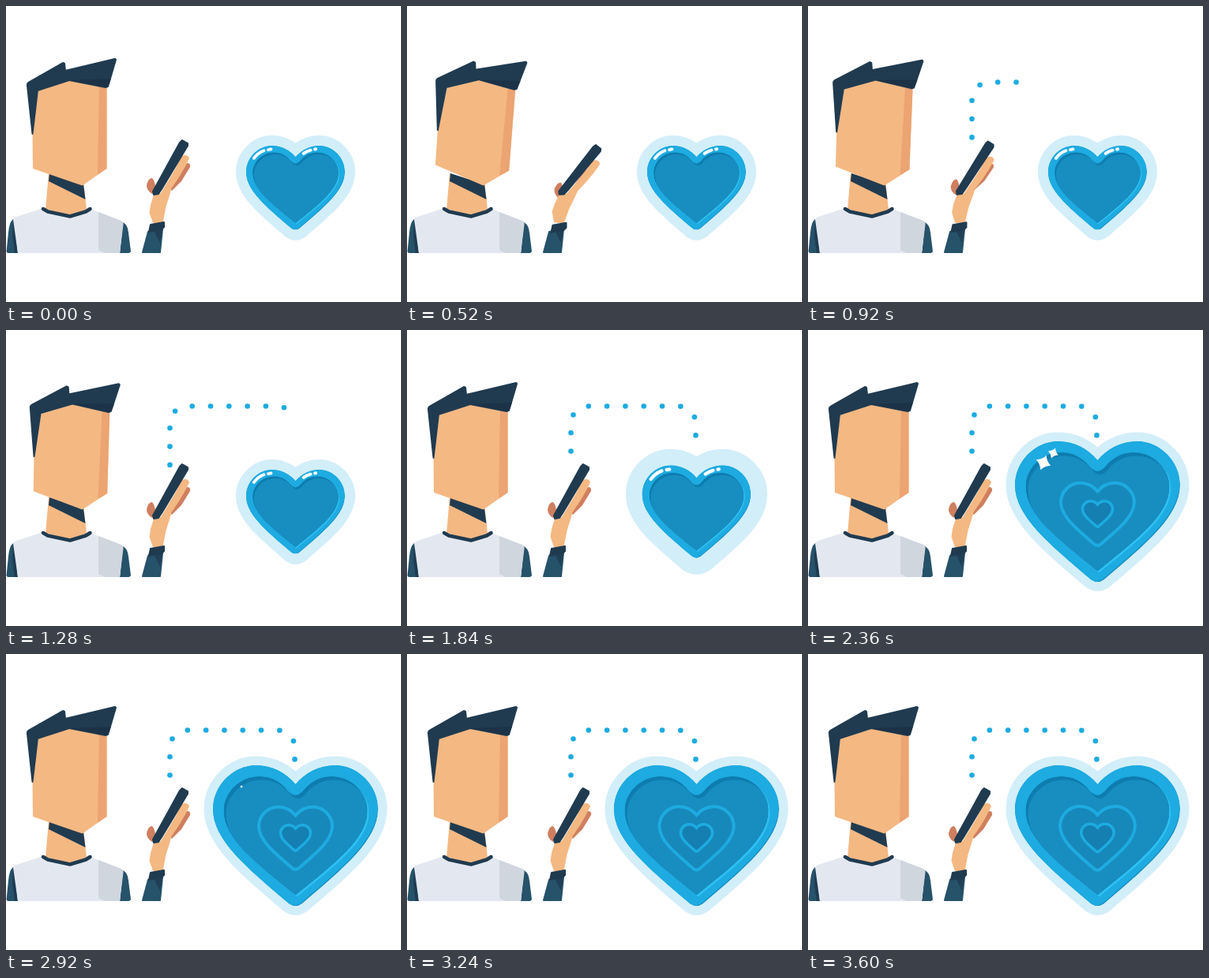
Write an HTML page that moves like this. It is 500x375 px and loops after 3680 ms.

```html
<!DOCTYPE html>
<html lang="en">
<head>
<meta charset="utf-8">
<title>Phone to heart</title>
<style>
html, body { margin: 0; width: 100%; height: 100%; overflow: hidden; background: #fff; }
svg { display: block; width: 500px; height: 375px; }
.round { stroke-linejoin: round; stroke-linecap: round; }
.navy { fill: #203b50; stroke: #203b50; stroke-width: 2; stroke-linejoin: round; }
.clay { fill: #cf7f5f; }
.skin { fill: #f4b882; }
</style>
</head>
<body>
<svg viewBox="0 0 500 375" xmlns="http://www.w3.org/2000/svg">
  <defs>
    <path id="heart" d="M0-65.5C-12-80-30-89.5-50-89.5C-79-89.5-104.5-64-104.5-34C-104.5 5-62 40-8 86Q0 91.500 8 86C62 40 104.5 5 104.5-34C104.5-64 79-89.5 50-89.5C30-89.5 12-80 0-65.5Z"/>
    <path id="face" d="M-10-58C-20-70-32-75.5-46-75.5C-71-75.5-91-55-91-32C-91 3-52 33 0 75C52 33 91 3 91-32C91-55 71-75.5 46-75.5C32-75.5 20-70 10-58Q0-46-10-58Z"/>
    <path id="star" d="M0-10Q3-3 10 0Q3 3 0 10Q-3 3-10 0Q-3-3 0-10Z"/>
    <clipPath id="outline"><use href="#heart"/></clipPath>
    <clipPath id="inside"><use href="#face"/></clipPath>
  </defs>

  <g id="body">
    <path class="skin" d="M54 212L98.500 226L102 258L79 267L50 258Z"/>
    <path fill="#203b50" d="M55 212L98 226L100.500 245L54 222Z"/>
    <path fill="#26526a" d="M9 270Q4 274 3 287L0.500 311Q1 313 3 313H15L11 272Z"/>
    <path fill="#203b50" d="M9 271L14.500 313H11L8 290Z"/>
    <path fill="#26526a" d="M148 274Q154 277 155 287L158 311Q157 313 155 313H144Z"/>
    <path fill="#e3e8f0" d="M9 270Q10 268 13 267L47 256L81 266L106 257L117 261L148 274L144 313H15Z"/>
    <path fill="#d0d6de" d="M117 261L146 272Q149 274 148.500 277L144 313H125L117 309Z"/>
    <path class="round" fill="none" stroke="#203b50" stroke-width="4.500" d="M47 257L53 260.500L81 266.500L101 260.500L106.500 257"/>
  </g>

  <g id="head">
    <path class="skin" d="M41 107L80 94L127.500 100V206L96.500 227.500L34 206L33.500 160Z"/>
    <path fill="#eba472" d="M118 100H127.500V206L116 213.500Z"/>
    <path class="navy" d="M27 101Q26.500 98 29 96.500L72 72L74 73L75 82L138 67L139 68L129 102L126 103L80 94L40 107L33.500 162Z"/>
    <path fill="#1c3247" d="M80 94L133 92L129 102L126 103Z"/>
  </g>

  <path fill="#26526a" stroke="#26526a" stroke-width="2" stroke-linejoin="round" d="M180 286L198 283L195 312H173Z"/>
  <path fill="#203f55" d="M188 286L198 283L195 300Z"/>
  <g id="hand">
    <path class="clay" id="finger" d="M229 199Q234 199 233 204L222 222L210 234L208 232L217 212Z"/>
    <path class="clay" id="thumb" d="M178 227Q180 218 185 218Q189 222 190 236L185 238Q178 234 178 227Z"/>
    <path class="skin" d="M186 275L181.500 262L183 252L187 239L196 237L205 222L215 205L222 190Q230 187 232 193L226 205L219 217L209.500 231L207 240L202.500 254L198.500 275Z"/>
    <path class="navy" d="M223 170L230 174V177L197 232L193 238L187 239L186 235L220 173Z"/>
  </g>
  <path class="navy" id="cuff" d="M183 277L200 274V280L197 283L181 286Z"/>

  <path id="track" fill="none" d="M207.500 175V118.500A22 22 0 0 1 229.500 96.500H343.500A22 22 0 0 1 365.500 118.500V134"/>
  <g id="dots" fill="#1dabe1"></g>

  <g transform="translate(366.500 230.500)">
    <g id="big">
      <use id="glow" class="round" href="#heart" fill="#d2eef9" stroke="#d2eef9"/>
      <g clip-path="url(#outline)">
        <use href="#heart" fill="#188dc0"/>
        <use href="#heart" fill="#1dabe1" transform="translate(-1.500 -1.500)"/>
        <use href="#heart" fill="none" stroke="#1dabe1" stroke-width="4" transform="translate(-2.500 -2.500)"/>
      </g>
      <use href="#face" fill="#2ec0f2" transform="translate(2 2)"/>
      <g clip-path="url(#inside)">
        <use href="#face" fill="#0e7cae"/>
        <use href="#face" fill="#188dc0" transform="translate(3 4.500)"/>
      </g>
      <path id="shine" class="round" fill="none" stroke="#fff" stroke-width="6.500" d="M-88-63Q-80-74-67-79M-57.500-81L-52-82M17-73Q24-78 32-80M41-82L43-82.300"/>
    </g>
    <g id="small" stroke="#1dabe1">
      <use id="mid" href="#heart" fill="#1788ba"/>
      <use id="core" href="#heart" fill="#147fb0"/>
    </g>
  </g>
  <g fill="#fff">
    <use id="starA" href="#star"/>
    <use id="starB" href="#star"/>
  </g>
</svg>

<script>
const LOOP = 3680, STEP = 40, GAP = 23.3, COUNT = 11;
const $ = id => document.getElementById(id);
const set = (id, name, value) => $(id).setAttribute(name, value);
const span = (t, a, b) => Math.max(0, Math.min(1, (t - a) / (b - a)));
const mix = (a, b, k) => a + (b - a) * k;
const inOut = u => u < 0.5 ? 2 * u * u : 1 - 2 * (1 - u) * (1 - u);
const out = u => 1 - (1 - u) * (1 - u);

const track = $("track");
const trackLen = 21.5 + (COUNT - 1) * GAP;
const dots = Array.from({ length: COUNT }, () => {
  const dot = document.createElementNS("http://www.w3.org/2000/svg", "circle");
  dot.setAttribute("r", 3.3);
  return $("dots").appendChild(dot);
});

function drawMan(t) {
  const rise = inOut(span(t, 0, 550));
  const lean = rise * (1 - 0.6 * out(span(t, 560, 1200)) - 0.4 * inOut(span(t, 1200, 1760)));
  const tap = rise * (1 - inOut(span(t, 600, 1120)));
  set("head", "transform", `rotate(${4.5 * lean} 96 228)`);
  set("hand", "transform", `rotate(${9 * tap} 192 275)`);
  set("finger", "transform", `translate(${-5 * tap} ${-5 * tap})`);
  set("thumb", "transform", `translate(${2 * tap} ${6 * tap})`);
  set("cuff", "transform", `translate(${1.5 * tap} ${0.7 * tap})`);
}

function drawDots(t) {
  const front = trackLen * out(span(t, 590, 1740));
  dots.forEach((dot, i) => {
    const s = front - i * GAP, on = t > 590 && s >= 0;
    dot.style.display = on ? "" : "none";
    if (!on) return;
    const p = track.getPointAtLength(s);
    dot.setAttribute("cx", p.x);
    dot.setAttribute("cy", p.y);
  });
}

// A small heart whose line keeps its width at any scale
function drawRing(id, y, scale, line) {
  set(id, "transform", `translate(0 ${y}) scale(${scale})`);
  set(id, "stroke-width", line / scale);
}

function drawStar(id, x, y, scale) {
  $(id).style.display = scale > 0.01 ? "" : "none";
  set(id, "transform", `translate(${x} ${y}) rotate(22) scale(${scale})`);
}

function drawHeart(t) {
  const half = mix(62.5, 104.5, inOut(span(t, 1720, 2160)));
  const halo = mix(75.5, 116, inOut(span(t, 1640, 2120)));
  const size = half / 104.5;
  set("big", "transform", `scale(${size})`);
  set("glow", "stroke-width", 2 * (halo - half) / size);
  set("shine", "opacity", 1 - span(t, 1880, 2040));

  const grow = out(span(t, 2000, 2280));
  const beat = 0.3 - 0.5 * Math.cos((t - 2640) / 1920 * 2 * Math.PI);
  $("small").style.display = grow > 0 ? "" : "none";
  if (grow > 0) {
    set("small", "opacity", grow);
    drawRing("mid", 3, 0.445 * grow * (1 + 0.025 * beat), 4);
    drawRing("core", 2.5, 0.182 * grow * (1 + 0.11 * beat), 3.5);
  }

  const fade = 1 - inOut(span(t, 2400, 3000));
  drawStar("starA", 298, 168, out(span(t, 2160, 2360)) * Math.sqrt(fade));
  drawStar("starB", 310.5, 156, 0.7 * out(span(t, 2200, 2360)) * (1 - span(t, 2400, 2840)));
}

const start = performance.now();
function tick() {
  const t = (performance.now() - start) % LOOP;
  const held = Math.min(LOOP - 2 * STEP, Math.floor(t / STEP) * STEP);
  drawMan(held);
  drawDots(held);
  drawHeart(held);
  requestAnimationFrame(tick);
}
tick();
</script>
</body>
</html>
```
